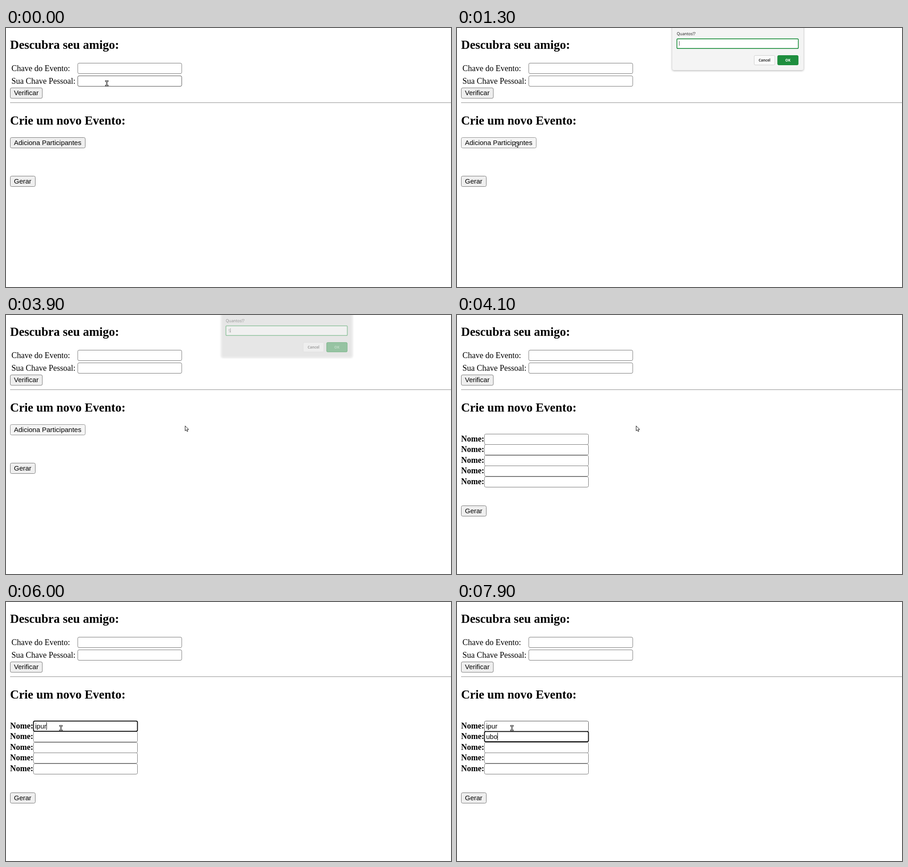
These frames come from a looping animation (980 by 571 pixels, 8 s). An HTML page with a canvas:

```html
<!DOCTYPE html>
<html lang="pt">
<head>
<meta charset="utf-8">
<title>Eventos</title>
<style>
  html, body { margin: 0; width: 100%; height: 100%; overflow: hidden; background: #fff; }
  canvas { display: block; }
</style>
</head>
<body>
<canvas id="stage" width="980" height="571"></canvas>
<script>
const ctx = document.getElementById('stage').getContext('2d');
const LOOP = 8000, STEP = 100;
const SERIF = '"Liberation Serif", serif';
const SANS = '15px "Liberation Sans", sans-serif';
const DIALOG_FONT = '8.7px "Noto Sans", sans-serif';
const GREEN = '#1e8e3e';
const FORM_AT = 4000;

// Pointer positions: time, x, y
const pointerPath = [
  [0, 222, 122], [200, 222, 122], [500, 186, 180], [800, 128.5, 251],
  [1400, 128.5, 251], [1600, 394.5, 244.5],
  [4300, 394.5, 244.5], [4400, 345, 240], [4500, 190, 256], [4600, 121, 278], [LOOP, 121, 278]
];

// Typing in the form: time, focused row, text, caret visible
const typing = [
  [4900, 0, '', true], [5500, 0, '', false], [5600, 0, 'i', true],
  [5800, 0, 'ip', true], [6000, 0, 'ipur', true],
  [6400, 1, '', true], [7000, 1, 'u', true], [7200, 1, 'ub', true],
  [7300, 1, 'ubo', true], [7600, 1, 'ub', true], [7700, 1, 'u', true],
  [7800, 1, 'ub', true], [7900, 1, 'ubo', true]
];

const within = (t, from, to) => t >= from && t < to;

function pointerAt(t) {
  const i = pointerPath.findIndex(p => p[0] > t);
  const [t0, x0, y0] = pointerPath[i - 1], [t1, x1, y1] = pointerPath[i];
  const k = (t - t0) / (t1 - t0);
  return { x: x0 + (x1 - x0) * k, y: y0 + (y1 - y0) * k };
}

function text(str, x, y, font, color = '#000', align = 'left') {
  ctx.font = font;
  ctx.fillStyle = color;
  ctx.textAlign = align;
  ctx.fillText(str, x, y);
}

// Rounded box whose border lies inside the given bounds
function box(x, y, w, h, fill, border, radius = 3, line = 1) {
  ctx.beginPath();
  ctx.roundRect(x + line / 2, y + line / 2, w - line, h - line, radius);
  ctx.fillStyle = fill;
  ctx.fill();
  ctx.strokeStyle = border;
  ctx.lineWidth = line;
  ctx.stroke();
}

function caret(x, y, h, color = '#000') {
  ctx.fillStyle = color;
  ctx.fillRect(Math.floor(x), y, 1, h);
}

const isOver = (p, x, y, w, h) => p.x >= x && p.x < x + w && p.y >= y && p.y < y + h;

function input(x, y, pointer) {
  const hover = isOver(pointer, x, y, 230, 24);
  box(x, y, 230, 24, '#fff', hover ? '#4f4f4f' : '#767676');
  return hover;
}

function button(label, y, w, pointer, pressed = false) {
  const hover = isOver(pointer, 9, y, w, 24);
  const [fill, border] = pressed ? ['#f5f5f5', '#8d8d8d']
    : hover ? ['#e5e5e5', '#4f4f4f'] : ['#efefef', '#767676'];
  box(9, y, w, 24, fill, border);
  text(label, 17.5, y + 16.5, SANS);
}

function drawForm(t, pointer) {
  let overInput = false;
  const now = typing.filter(e => e[0] <= t).pop();
  for (let row = 0; row < 5; row++) {
    const y = Math.floor(262 + row * 23.5);
    text('Nome:', 9, y + 17, `bold 18px ${SERIF}`);
    if (input(60, y, pointer)) overInput = true;
  }
  if (now) {
    const [, row, value, caretOn] = now;
    const y = Math.floor(262 + row * 23.5);
    box(59.5, y - 0.5, 231, 24.5, '#fff', '#101010', 3, 2);
    if (row === 1) text('ipur', 64, 279, SANS);
    text(value, 64, y + 17, SANS);
    if (caretOn) caret(64 + ctx.measureText(value).width, y + 3, 17);
  }
  return overInput;
}

function drawDialog(t) {
  ctx.save();
  ctx.globalAlpha = t < 1200 ? 0.4 : t < 1300 ? 0.85 : t < 3900 ? 1 : 0.4;
  ctx.shadowColor = 'rgba(0,0,0,.35)';
  ctx.shadowBlur = 4;
  ctx.shadowOffsetY = 1;
  ctx.fillStyle = '#f4f4f4';
  ctx.beginPath();
  ctx.roundRect(474, -20, 289, 113, 4);
  ctx.fill();
  ctx.shadowColor = 'transparent';

  text('Quantos!?', 484, 15.5, DIALOG_FONT, '#222');
  box(483.5, 23, 269, 23, '#fff', GREEN, 2, 1.7);
  box(654, 60, 46.5, 22, '#fafafa', '#cfcfcf', 2.5);
  text('Cancel', 677.2, 74, 'bold 7.9px "Noto Sans", sans-serif', '#333', 'center');
  box(705.5, 60, 46.5, 22, GREEN, GREEN, 2.5);
  text('OK', 728.8, 74, 'bold 7.9px "Noto Sans", sans-serif', '#fff', 'center');

  const typed = t >= 3500;
  if (typed) text('5', 489.7, 37.5, DIALOG_FONT, '#444');
  if (within(t, 1300, 1600) || within(t, 2100, 2700) || t >= 3200)
    caret(typed ? 494 : 489, 29, 10, '#555');
  ctx.restore();
}

function drawPointer({ x, y }, isBeam) {
  ctx.save();
  ctx.translate(x, y);
  if (isBeam) {
    const beam = new Path2D('M-2.2-5H2.2M0-5V5M-2.2 5H2.2');
    ctx.lineCap = 'square';
    for (const [color, width] of [['#222', 2.8], ['#eee', 0.9]]) {
      ctx.strokeStyle = color;
      ctx.lineWidth = width;
      ctx.stroke(beam);
    }
  } else {
    const arrow = new Path2D('M0 0V10.8L2.5 8.6 4.3 12.4 6.1 11.6 4.4 7.9H7.8Z');
    ctx.fillStyle = '#fff';
    ctx.fill(arrow);
    ctx.strokeStyle = '#111';
    ctx.lineWidth = 1;
    ctx.stroke(arrow);
  }
  ctx.restore();
}

function draw(t) {
  const pointer = pointerAt(t);
  const formShown = t >= FORM_AT;
  ctx.fillStyle = '#fff';
  ctx.fillRect(0, 0, 980, 571);

  text('Descubra seu amigo:', 9, 46, `bold 27px ${SERIF}`);
  text('Chave do Evento:', 12, 95, `18px ${SERIF}`);
  text('Sua Chave Pessoal:', 12, 123, `18px ${SERIF}`);
  const overKey = input(157.5, 77, pointer);
  let overInput = input(157.5, 105, pointer) || overKey;
  button('Verificar', 131.5, 71.5, pointer);

  ctx.fillStyle = '#9a9a9a';
  ctx.fillRect(9, 164, 971, 1);
  ctx.fillStyle = '#eee';
  ctx.fillRect(9, 165, 971, 1);
  text('Crie um novo Evento:', 9, 213, `bold 27px ${SERIF}`);

  if (formShown) overInput = drawForm(t, pointer) || overInput;
  else button('Adiciona Participantes', 241, 166, pointer, t >= 1000);
  button('Gerar', formShown ? 420 : 326, 56, pointer);

  if (within(t, 1100, 4100)) drawDialog(t);
  drawPointer(pointer, overInput);
}

function tick() {
  const t = performance.now() % LOOP;
  draw(Math.floor(t / STEP) * STEP);
  requestAnimationFrame(tick);
}
tick();
</script>
</body>
</html>
```
